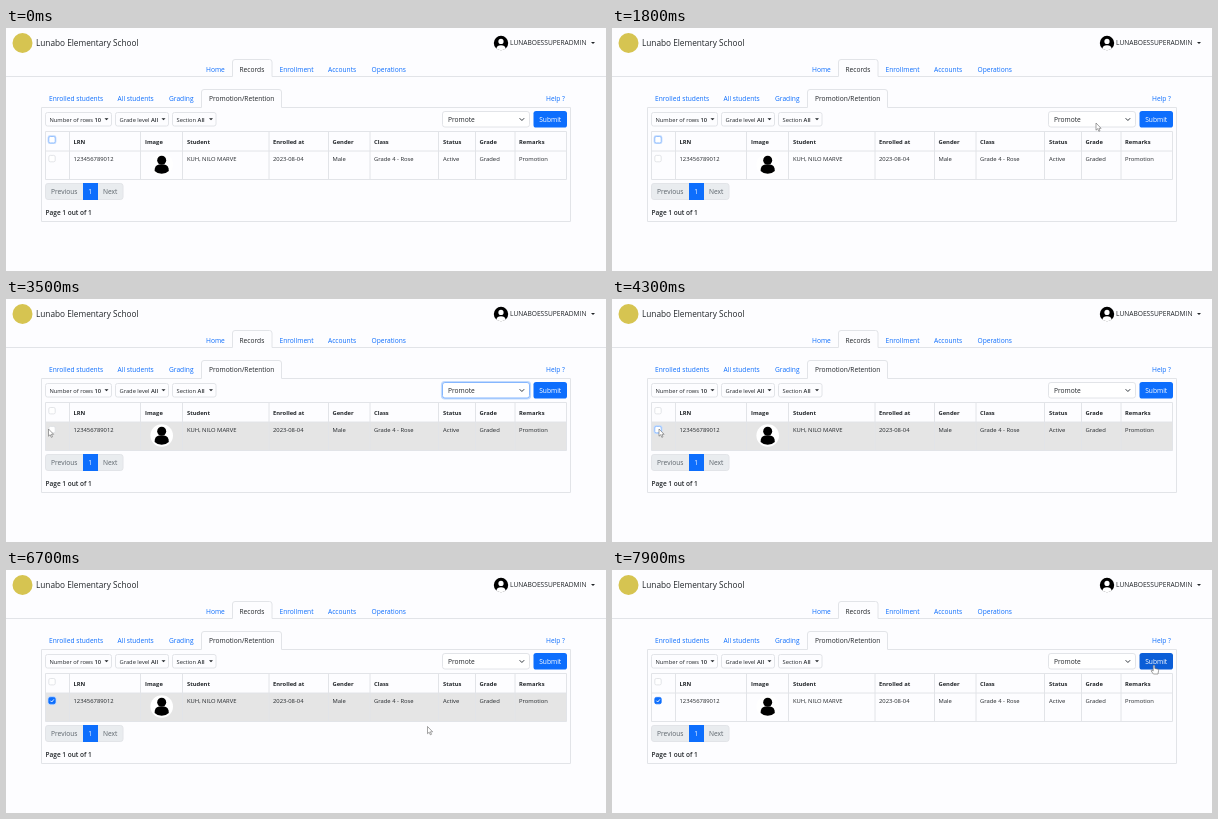
An HTML page for the animation above (8 s loop, 600 px wide and 243 px high).

```html
<!DOCTYPE html>
<html lang="en">
<head>
<meta charset="utf-8">
<title>Student records</title>
<style>
  html, body { margin: 0; width: 100%; height: 100%; overflow: hidden; background: #fdfdff; }
  svg { display: block; width: 600px; height: 243px; font-family: "Open Sans", "Noto Sans", sans-serif; }
</style>
</head>
<body>
<svg id="stage" viewBox="0 0 600 243"></svg>
<script>
const NS = 'http://www.w3.org/2000/svg';
const stage = document.getElementById('stage');
const BLUE = '#0d6efd', INK = '#212529', LINE = '#e2e4e8', GLOW = '#86b7fe';

function add(tag, attrs, parent = stage) {
  const el = document.createElementNS(NS, tag);
  for (const k in attrs) el.setAttribute(k, attrs[k]);
  parent.appendChild(el);
  return el;
}
const rect = (x, y, w, h, attrs) =>
  add('rect', { x, y, width: w, height: h, fill: 'none', ...attrs });
const path = (d, attrs) => add('path', { d, fill: 'none', ...attrs });
const circle = (cx, cy, r, fill) => add('circle', { cx, cy, r, fill });
function text(str, x, y, size = 6.65, attrs = {}) {
  const el = add('text', { x, y, 'font-size': size, fill: INK, ...attrs });
  el.textContent = str;
  return el;
}
const caret = (x, y) => path(`M${x} ${y}h4l-2 2.1z`, { fill: INK });
const show = (el, on) => el.setAttribute('visibility', on ? 'visible' : 'hidden');

// Page header
circle(16.5, 15, 10, '#d6c451');
text('Lunabo Elementary School', 30, 17.6, 8.25);
circle(495, 15, 7.2, '#000');
circle(495, 13.4, 2.6, '#fff');
path('M490.4 20.5Q491 17.2 495 17.2T499.6 20.5Q497.8 22.2 495 22.2T490.4 20.5z', { fill: '#fff' });
text('LUNABOESSUPERADMIN', 504, 17.4);
caret(585, 14);

// Main tabs
path('M0 48.5H226.5V34Q226.5 31.5 229 31.5H263.5Q266 31.5 266 34V48.5H600', { stroke: LINE });
[['Home', 200], ['Records', 233.5], ['Enrollment', 273.5], ['Accounts', 322], ['Operations', 365.5]]
  .forEach(([s, x], i) => text(s, x, 44, 6.65, { fill: i === 1 ? INK : BLUE }));

// Panel and its tabs
path('M35.5 79.5H195.5V64Q195.5 61.5 198 61.5H273Q275.5 61.5 275.5 64V79.5H564.5V193.5H35.5z',
  { stroke: LINE });
[['Enrolled students', 43], ['All students', 111.5], ['Grading', 163], ['Promotion/Retention', 203], ['Help ?', 540]]
  .forEach(([s, x], i) => text(s, x, 73, 6.65, { fill: i === 3 ? INK : BLUE }));

// Filters
[[39.5, 66, 'Number of rows', '10'], [109.5, 53, 'Grade level', 'All'], [166.5, 43.5, 'Section', 'All']]
  .forEach(([x, w, label, value]) => {
    rect(x, 84.5, w, 13.5, { rx: 2, stroke: LINE });
    const t = text(label + ' ', x + 4, 93.6, 5.75);
    const b = add('tspan', { 'font-weight': 600 }, t);
    b.textContent = value;
    caret(x + w - 7, 90.2);
  });

const selectGlow = rect(435.7, 82.8, 88.6, 17, { rx: 3, stroke: '#c2dbfe', 'stroke-width': 1.6 });
const select = rect(436.5, 83.5, 87, 15.5, { rx: 2.4, fill: '#fff' });
text('Promote', 442, 94);
path('M513.6 90.2l2.3 2.3 2.3-2.3', { stroke: '#343a40' });
const submit = rect(527.5, 83, 33.5, 16.5, { rx: 2.6 });
text('Submit', 544.2, 94, 6.65, { fill: '#fff', 'text-anchor': 'middle' });

// Table
const hover = rect(39.5, 123, 521, 28.5, { fill: '#e5e5e5' });
[103.5, 123, 151.5].forEach(y => path(`M39.5 ${y}H560.5`, { stroke: LINE }));
[39.5, 63.5, 134.5, 176.5, 263, 322.5, 364, 432.5, 469.5, 509, 560.5]
  .forEach(x => path(`M${x} 103.5V151.5`, { stroke: LINE }));
[
  ['LRN', '123456789012', 67.5], ['Image', '', 139], ['Student', 'KUH, NILO MARVE', 181],
  ['Enrolled at', '2023-08-04', 267], ['Gender', 'Male', 326.5], ['Class', 'Grade 4 - Rose', 368],
  ['Status', 'Active', 437], ['Grade', 'Graded', 473.5], ['Remarks', 'Promotion', 513],
].forEach(([head, cell, x]) => {
  text(head, x, 115.6, 5.8, { 'font-weight': 700 });
  text(cell, x, 133, 5.85);
});
circle(155.7, 136.5, 11.3, '#fff');
circle(155.7, 132.2, 4.5, '#000');
path('M148.6 143Q148.4 137 153 136.4H158.4Q163 137 162.8 143Q160 145.8 155.7 145.8T148.6 143z', { fill: '#000' });

function checkbox(x, y) {
  const glow = rect(x - 1.2, y - 1.2, 8.8, 8.8, { rx: 2.4, fill: '#c2dbfe' });
  const box = rect(x, y, 6.4, 6.4, { rx: 1.5, 'stroke-width': .8 });
  const tick = path(`M${x + 1.6} ${y + 3.3}l1.3 1.3 2.2-2.6`, { stroke: '#fff', 'stroke-width': .9 });
  return (checked, focused) => {
    show(glow, focused);
    show(tick, checked);
    box.setAttribute('fill', checked ? BLUE : '#fff');
    box.setAttribute('stroke', checked ? BLUE : focused ? GLOW : '#dcdfe3');
  };
}
const allBox = checkbox(42.8, 108.5);
const rowBox = checkbox(42.8, 127.4);

// Pagination
rect(39.5, 155.5, 77.5, 16, { rx: 2.4, fill: '#e9ecef', stroke: LINE });
rect(77, 155, 15, 17, { fill: BLUE });
text('Previous', 45, 166, 6.65, { fill: '#5c646b' });
text('1', 84.2, 166, 6.65, { fill: '#fff', 'text-anchor': 'middle' });
text('Next', 97, 166, 6.65, { fill: '#5c646b' });
text('Page 1 out of 1', 39.5, 186.7, 6.5, { 'font-weight': 600 });

// Pointers, drawn with the tip at 0,0
const skin = { fill: '#fff', stroke: '#666', 'stroke-width': .6, 'stroke-linejoin': 'round' };
const arrow = path('M0 0V7.2L1.7 5.7 2.8 8.3 4 7.8 2.9 5.3H5.1z', skin);
const hand = path('M-.8 .6Q0-.6 .8 .6V3.4L4 4.2Q4.8 4.5 4.6 5.4L4 9H-.6L-3 5.8Q-2.6 4.6-.8 6z', skin);

// time, x, y
const track = [
  [300, 500, 240], [900, 490, 122], [1700, 484, 95], [2700, 484, 95],
  [3100, 133.5, 130], [3400, 38, 130], [3600, 47, 130], [4500, 47, 130],
  [4900, 45.5, 109.5], [5900, 45.5, 109.5], [6200, 47, 130], [6500, 47, 130],
  [6700, 421.5, 156.5], [7100, 505, 194], [7200, 505, 194], [7700, 542, 95], [8000, 542, 95],
];
function pointer(t) {
  const i = track.findIndex(k => k[0] > t);
  const [t0, x0, y0] = track[i - 1], [t1, x1, y1] = track[i];
  const p = (t - t0) / (t1 - t0), e = p * p * (3 - 2 * p);
  return [x0 + (x1 - x0) * e, y0 + (y1 - y0) * e];
}

const within = (t, ...spans) => spans.some(([a, b]) => t >= a && t < b);

function render(time) {
  const t = Math.floor(time % 8000 / 100) * 100;
  const selected = within(t, [1900, 3700]);
  const pressed = t >= 7700;

  allBox(within(t, [4900, 5900]), within(t, [0, 1900], [4900, 6300]));
  rowBox(within(t, [3800, 4200], [4900, 5900], [6300, 8000]), within(t, [3800, 4900], [6300, 7700]));
  show(hover, within(t, [3200, 4700], [6100, 6800]));
  show(selectGlow, selected);
  select.setAttribute('stroke', selected ? GLOW : LINE);
  submit.setAttribute('fill', pressed ? '#0b5ed7' : BLUE);

  const visible = t >= track[0][0];
  show(arrow, visible && !pressed);
  show(hand, visible && pressed);
  if (visible) {
    const move = `translate(${pointer(t)})`;
    arrow.setAttribute('transform', move);
    hand.setAttribute('transform', move);
  }
}

const start = performance.now();
function tick(now) {
  render(Math.max(0, now - start));
  requestAnimationFrame(tick);
}
render(0);
requestAnimationFrame(tick);
</script>
</body>
</html>
```
